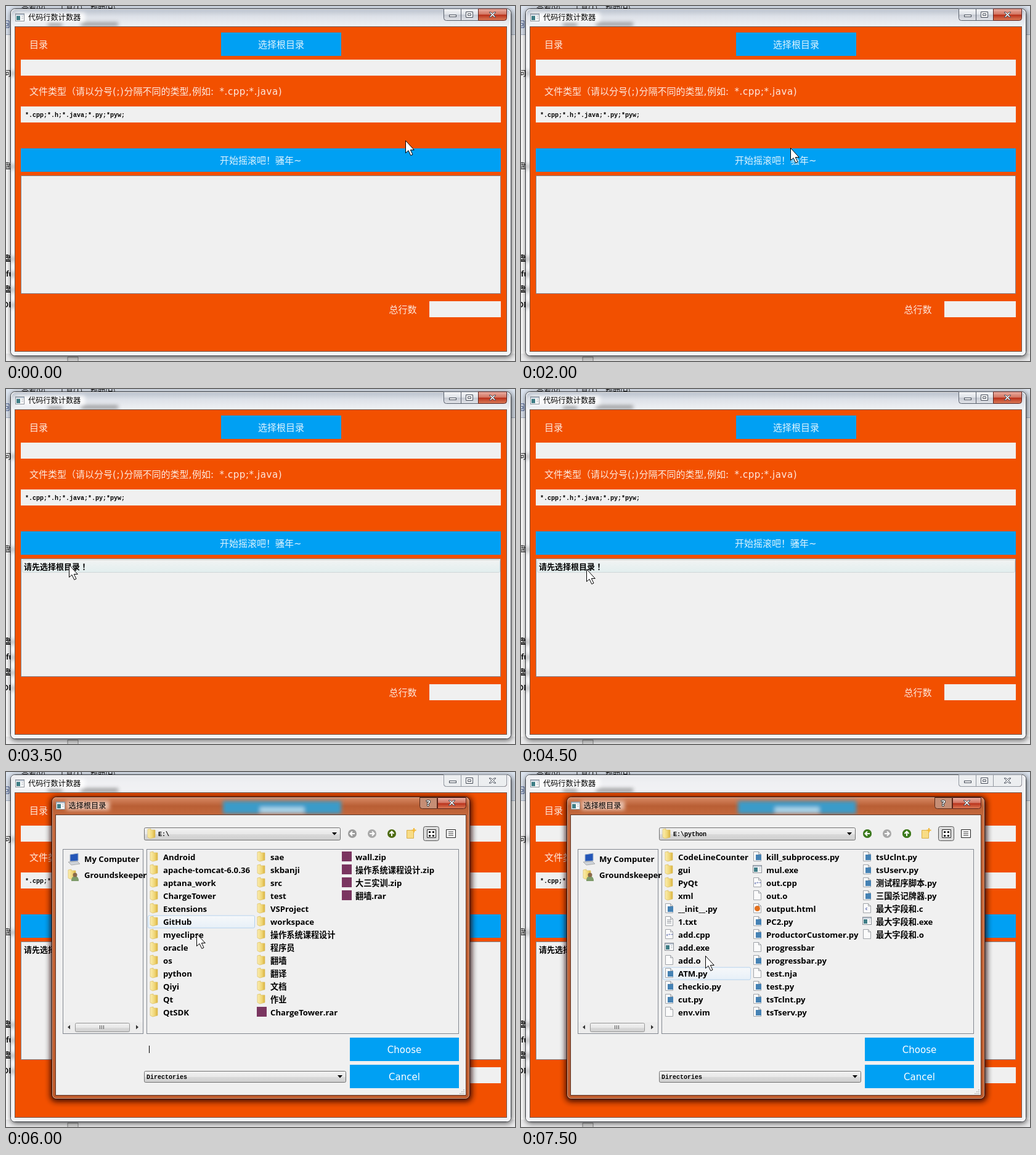
These frames come from a looping animation (826 by 576 pixels, 8 s). An HTML page:

```html
<!DOCTYPE html>
<html lang="zh">
<head>
<meta charset="utf-8">
<title>代码行数计数器</title>
<style>
html, body { margin: 0; width: 100%; height: 100%; overflow: hidden; background: #fff; }
svg { display: block; }
text { white-space: pre; }
.ui { font: 300 15px "Noto Sans CJK SC", "Noto Sans CJK", sans-serif; fill: #fff; fill-opacity: .88; }
.latin { font: 400 15px "DejaVu Sans", sans-serif; letter-spacing: .58px; }
.btn { font: 15px "DejaVu Sans", sans-serif; fill: #fff; text-anchor: middle; }
.cap { font: 12.2px "Noto Sans CJK SC", "Noto Sans CJK", sans-serif; fill: #000; }
.bold { font: bold 13.2px "Open Sans", "Noto Sans CJK SC", "Noto Sans CJK", sans-serif; fill: #000; }
.bold.note { font-size: 13px; }
.centred { font-family: "Noto Sans CJK JP", sans-serif; }
.mono { font: bold 10px "Liberation Mono", monospace; fill: #000; }
.back { font: 12px "Noto Sans CJK SC", "Noto Sans CJK", sans-serif; fill: #111; }
.blue { fill: #00a0f3; }
.hot { fill: #0080f3; }
.field { fill: #f0f0f0; }
.frame { fill: #f0f0f0; stroke: #828790; }
.glyph { fill: #fff; stroke: #444b57; }

/* every state holds until the next stop */
.on, #cursor { animation: 8s step-end infinite; }
.on { visibility: hidden; }
.pick { animation-name: pick; }
.rock { animation-name: rock; }
.press { animation-name: press; }
.note { animation-name: note; }
.row { animation-name: row; }
.dialog { animation-name: dialog; }
.first { animation-name: first; }
.second { animation-name: second; }
.typed { animation-name: typed; }
.drive { animation-name: drive; }
.inside { animation-name: inside; }
#cursor { animation-name: move; }
@keyframes pick { 0%, 25%, 75% { visibility: hidden } 18.75%, 68.75% { visibility: visible } }
@keyframes rock { 0%, 43.75% { visibility: hidden } 31.25% { visibility: visible } }
@keyframes press { 0%, 43.75% { visibility: hidden } 37.5% { visibility: visible } }
@keyframes note { 0% { visibility: hidden } 37.5%, 100% { visibility: visible } }
@keyframes row { 0%, 62.5% { visibility: hidden } 43.75% { visibility: visible } }
@keyframes dialog { 0% { visibility: hidden } 75%, 100% { visibility: visible } }
@keyframes first { 0%, 81.25% { visibility: hidden } 75% { visibility: visible } }
@keyframes second { 0%, 93.75% { visibility: hidden } 81.25% { visibility: visible } }
@keyframes typed { 0%, 93.75% { visibility: hidden } 87.5% { visibility: visible } }
@keyframes drive { 0%, 93.75% { visibility: hidden } 75% { visibility: visible } }
@keyframes inside { 0% { visibility: hidden } 93.75%, 100% { visibility: visible } }
@keyframes move {
  0% { transform: translate(648px, 218px) }
  6.25% { transform: translate(491px, 97px) }
  12.5% { transform: translate(463px, 99px) }
  18.75% { transform: translate(448px, 68px) }
  25% { transform: translate(437px, 230px) }
  31.25% { transform: translate(482px, 244px) }
  37.5% { transform: translate(430px, 247px) }
  43.75% { transform: translate(102px, 285px) }
  50% { transform: translate(95px, 290px) }
  56.25% { transform: translate(106px, 292px) }
  62.5% { transform: translate(430px, 19px) }
  68.75% { transform: translate(418px, 77px) }
  75% { transform: translate(309px, 262px) }
  81.25% { transform: translate(296px, 318px) }
  87.5% { transform: translate(298px, 320px) }
  93.75%, 100% { transform: translate(299px, 298px) }
}
</style>
</head>
<body>
<svg width="826" height="576" viewBox="0 0 826 576">
  <defs>
    <linearGradient id="glass" x2="0" y2="1">
      <stop offset="0" stop-color="#bcc3ce"/><stop offset=".4" stop-color="#dde1e8"/>
      <stop offset="1" stop-color="#eff1f4"/>
    </linearGradient>
    <linearGradient id="grey" x2="0" y2="1">
      <stop offset="0" stop-color="#f6f7f9"/><stop offset=".48" stop-color="#dfe2e7"/>
      <stop offset=".52" stop-color="#c6cad2"/><stop offset="1" stop-color="#e2e4e9"/>
    </linearGradient>
    <linearGradient id="red" x2="0" y2="1">
      <stop offset="0" stop-color="#eab0a4"/><stop offset=".48" stop-color="#d37460"/>
      <stop offset=".52" stop-color="#b9311b"/><stop offset="1" stop-color="#dc7d59"/>
    </linearGradient>
    <linearGradient id="copper" x2="0" y2="1">
      <stop offset="0" stop-color="#d98b66"/><stop offset=".03" stop-color="#b95f35"/>
      <stop offset=".06" stop-color="#c4683c"/><stop offset="1" stop-color="#bd5a2c"/>
    </linearGradient>
    <linearGradient id="combo" x2="0" y2="1">
      <stop offset="0" stop-color="#f2f2f2"/><stop offset=".5" stop-color="#e8e8e8"/>
      <stop offset=".52" stop-color="#dadada"/><stop offset="1" stop-color="#cfcfcf"/>
    </linearGradient>
    <linearGradient id="gold">
      <stop offset="0" stop-color="#fbeeb0"/><stop offset=".6" stop-color="#f0d676"/><stop offset="1" stop-color="#d9b23e"/>
    </linearGradient>
    <linearGradient id="hover" x2="0" y2="1">
      <stop offset="0" stop-color="#f6f8fa"/><stop offset="1" stop-color="#e7f0f8"/>
    </linearGradient>
    <linearGradient id="mint" x2="0" y2="1">
      <stop offset="0" stop-color="#f1f3f3"/><stop offset="1" stop-color="#e2eeee"/>
    </linearGradient>
    <filter id="soft" x="-50%" y="-100%" width="200%" height="300%"><feGaussianBlur stdDeviation="3"/></filter>
    <filter id="halo" x="-20%" y="-20%" width="140%" height="140%"><feGaussianBlur stdDeviation="5"/></filter>
    <path id="chevron" d="M0 0h12l16 16-16 16H0l14-16z"/>
    <g id="app">
      <rect x=".5" y=".5" width="14" height="12" fill="#fff" stroke="#8a9097"/>
      <path d="M1 1h13v2H1z" fill="#b9c4d2"/><path d="M2 4h6v7H2z" fill="#3f7d86"/>
      <path d="M10 5h3M10 8h3" stroke="#a9b1ba"/>
    </g>
    <path id="folder" d="M1 1 6 0v2h7v12l-8 2-4-2z" fill="url(#gold)" stroke="#dcbf62" stroke-width=".7"/>
    <path id="page" d="M1.5 .5h8l4 4v11h-12zM9.5 .5v4h4" fill="#fbfbfb" stroke="#a0a4a9"/>
    <path id="rows" d="M0 0h8M0 3h8M0 6h8" stroke="#333"/>
  </defs>

  <!-- what lies behind the window -->
  <rect width="826" height="576" fill="#fff"/>
  <rect width="826" height="46" fill="#dde5f0"/>
  <path d="M0 46.5h826" stroke="#aab6c8"/>
  <rect y="564" width="826" height="12" fill="#ededee"/>
  <path d="M100 569.5h17v8h-17z" fill="#ddd" stroke="#888"/>
  <path d="M0 24h5v11H0M0 28h3v4H0" fill="none" stroke="#344a82"/>
  <g class="back">
    <text x="25" y="8">查看(V)</text><text x="85" y="8">工具(T)</text><text x="137" y="8">帮助(H)</text>
    <text x="-4" y="114">问</text><text x="-4" y="264">盘</text>
    <g font-weight="bold"><text x="-4" y="414">盘</text><text x="0" y="439">fu</text>
    <text x="-4" y="464">盘</text><text x="-5" y="489">ON</text></g>
  </g>

  <!-- main window -->
  <rect x="8" y="6" width="813" height="564" rx="7" fill="#000" opacity=".65" filter="url(#halo)"/>
  <rect x="7.5" y="4.5" width="812" height="563" rx="7" fill="#f4f5f7" stroke="#34383f"/>
  <rect x="9" y="6" width="809" height="27" rx="6" fill="url(#glass)"/>
  <rect class="on dialog" x="8" y="5" width="811" height="562" rx="6" fill="#f2f3f5" opacity=".85"/>
  <rect x="8.5" y="5.5" width="810" height="561" rx="6" fill="none" stroke="#fff" opacity=".85"/>
  <g filter="url(#soft)" opacity=".55">
    <path d="M68 27h23v5H68zM122 27h60v5h-60zM9 105h4v9H9zM9 256h4v9H9zM9 406h4v9H9zM9 431h4v9H9zM9 456h4v9H9zM9 481h4v9H9z" fill="#333"/>
  </g>
  <rect x="16" y="11" width="112" height="15" fill="#fff" opacity=".9" filter="url(#soft)"/>
  <use href="#app" x="15" y="12"/>
  <text class="cap" x="36" y="22.5">代码行数计数器</text>

  <g stroke="#59606c">
    <path d="M710.5 4.5h56v19h-52q-4 0-4-4zM738.5 4.5v19" fill="url(#grey)"/>
    <path d="M766.5 4.5h46v15q0 4-4 4h-42z" fill="url(#red)" stroke="#5c2320"/>
  </g>
  <path class="on dialog" d="M710.5 4.5h102v15q0 4-4 4h-94q-4 0-4-4zM738.5 4.5v19M766.5 4.5v19" fill="#eceef0" stroke="#9297a0"/>
  <g class="glyph">
    <rect x="719.5" y="14.5" width="11" height="3"/>
    <path d="M746.5 9.5h11v9h-11zM749.5 12.5h5v3h-5z"/>
    <path d="M784 10h3l2.5 2.5L792 10h3l-4 4 4 4h-3l-2.5-2.5L787 18h-3l4-4z"/>
  </g>

  <rect x="14.5" y="33.5" width="798" height="527" fill="#f25000" stroke="#6e5a50"/>
  <text class="ui" x="38" y="67.5">目录</text>
  <rect class="blue" x="349" y="43" width="195" height="38"/>
  <text class="ui" x="409" y="67.5">选择根目录</text>
  <g class="on pick">
    <rect class="hot" x="349" y="43" width="195" height="38"/>
    <use href="#chevron" x="375" y="46"/>
    <text class="ui" x="429" y="67.5">选择根目录</text>
  </g>
  <rect class="field" x="24" y="87" width="779" height="26"/>
  <text class="ui" x="38" y="144">文件类型（请以分号<tspan class="latin">(;)</tspan>分隔不同的类型<tspan class="latin">,</tspan>例如<tspan class="latin">: </tspan><tspan class="latin" x="346.5">*.cpp;*.java)</tspan></text>
  <rect class="field" x="24" y="163" width="779" height="26"/>
  <text class="mono" x="31" y="180">*.cpp;*.h;*.java;*.py;*pyw;</text>

  <rect class="blue" x="24" y="231" width="779" height="38"/>
  <text class="ui" x="347" y="255.5">开始摇滚吧！骚年<tspan class="latin">~</tspan></text>
  <g class="on rock">
    <rect class="hot" x="24" y="231" width="779" height="38"/>
    <use href="#chevron" x="50" y="234"/>
    <text class="ui" x="367" y="255.5">开始摇滚吧！骚年<tspan class="latin">~</tspan></text>
  </g>
  <use class="on press" href="#chevron" x="50" y="234" fill="#f0f0f0"/>

  <rect class="frame" x="24.5" y="275.5" width="778" height="191"/>
  <rect class="on row" x="26.5" y="277.5" width="775" height="20" rx="2" fill="url(#mint)" stroke="#cfd6d8"/>
  <text class="bold on note" x="29" y="292.5">请先选择根目录<tspan class="centred" lang="ja">！</tspan></text>
  <text class="ui" x="621.5" y="498">总行数</text>
  <rect class="field" x="687" y="479" width="116" height="26"/>

  <!-- folder dialog -->
  <g class="on dialog">
    <rect x="72" y="40" width="684" height="495" rx="9" fill="#200" opacity=".85" filter="url(#halo)"/>
    <rect x="74.5" y="40.5" width="678" height="490" rx="7" fill="url(#copper)" stroke="#30140c"/>
    <rect x="75.5" y="41.5" width="676" height="488" rx="6" fill="none" stroke="#eeb79b" opacity=".75"/>
    <g filter="url(#soft)">
      <path d="M352 47h192v21H352z" fill="#3b9bc9"/>
      <path d="M412 57h72v10h-72z" fill="#d9edf7" opacity=".7"/>
      <path d="M98 47h70v15H98z" fill="#f4d9cb" opacity=".8"/>
    </g>
    <use href="#app" x="81" y="48"/>
    <text class="cap" x="101.5" y="59">选择根目录</text>
    <path d="M671.5 41.5h28v18h-24q-4 0-4-4z" fill="#c68e75" stroke="#5a2a1a"/>
    <path d="M700.5 41.5h46v14q0 4-4 4h-42z" fill="url(#red)" stroke="#5a2018"/>
    <text class="bold" x="685.5" y="55" text-anchor="middle" style="fill:#fff;stroke:#444;stroke-width:2px;paint-order:stroke">?</text>
    <path class="glyph" d="M718 46h3l2.5 2.5L726 46h3l-4 4 4 4h-3l-2.5-2.5L721 54h-3l4-4z"/>
    <rect class="field" x="80.5" y="69.5" width="666" height="455" stroke="#5d3526"/>

    <rect x="224.5" y="90.5" width="318" height="20" rx="2" fill="url(#combo)" stroke="#707070"/>
    <use href="#folder" x="229" y="92"/>
    <path d="M529 98h8l-4 4.5z"/>
    <g id="nav"></g>
    <path d="M650.5 94.5h11v13h-11z" fill="#f8dc85" stroke="#d9b04b"/>
    <path d="M662 91v7M658.5 94.5h7" stroke="#f2b632" stroke-width="2"/>
    <rect x="677.5" y="88.5" width="25" height="23" rx="3" fill="#dcdcdc" stroke="#555"/>
    <path d="M683.5 93.5h14v13h-14z" fill="#fff" stroke="#222"/>
    <path d="M686 96h3v3h-3zM692 96h3v3h-3zM686 102h3v3h-3zM692 102h3v3h-3z"/>
    <path d="M714.5 93.5h15v13h-15z" fill="#fff" stroke="#222"/>
    <use href="#rows" x="718" y="97"/>

    <rect class="frame" x="92.5" y="125.5" width="130" height="299"/>
    <path d="M104 134 117 132v12l-13 1z" fill="#2456b8" stroke="#9db0c9"/>
    <path d="M101 146l15-1 4 4-14 2z" fill="#cfd4da" stroke="#888" stroke-width=".6"/>
    <use href="#folder" x="100" y="158"/>
    <path d="M106 177q0-8 6-8t6 8z" fill="#7e9b6a"/><circle cx="112" cy="167" r="3.5" fill="#8a6a4a"/>
    <text class="bold" x="127" y="146">My Computer</text>
    <text class="bold" x="127" y="172">Groundskeeper</text>
    <path d="M93 406h129v18H93z" fill="#ececec"/>
    <rect x="112.5" y="407.5" width="88" height="14" rx="2" fill="url(#combo)" stroke="#979797"/>
    <path d="M152.5 411v6M155.5 411v6M158.5 411v6" stroke="#555"/>
    <path d="M104 410.5v7l-4-3.5zM211 410.5v7l4-3.5z" fill="#333"/>

    <rect class="frame" x="228.5" y="125.5" width="506" height="299"/>
    <g fill="url(#hover)" stroke="#b4d2ee">
      <rect class="on first" x="230.5" y="233" width="173" height="20" rx="2"/>
      <rect class="on second" x="230.5" y="317" width="173" height="20" rx="2"/>
      <rect class="on inside" x="230.5" y="317" width="142" height="20" rx="2"/>
    </g>
    <g class="on drive" id="drive"><text class="mono" x="247" y="104">E:\</text></g>
    <g class="on inside" id="inside"><text class="mono" x="247" y="104">E:\python</text></g>
    <path class="on first" d="M232.5 444v12" stroke="#000"/>
    <text class="mono on typed" x="231" y="454">python</text>

    <rect x="224.5" y="485.5" width="327" height="18" rx="2" fill="url(#combo)" stroke="#707070"/>
    <path d="M538 492h8l-4 4.5z"/>
    <text class="mono" x="228" y="498">Directories</text>
    <path class="blue" d="M558 431h177v38H558zM558 475h177v38H558z"/>
    <text class="btn" x="646.5" y="456">Choose</text>
    <text class="btn" x="646.5" y="500">Cancel</text>
    <path d="M743 515v8M740 518v5M737 521v2" stroke="#aaa" stroke-width="1.5" stroke-dasharray="1.5 1.5"/>
  </g>

  <path id="cursor" d="M.5.5v20l4.5-4 3.8 8 3.2-1.5-3.7-7.5h6z" fill="#fff" stroke="#000"/>
</svg>
<script>
const add = (id, markup) => document.getElementById(id).insertAdjacentHTML('beforeend', markup);

const badges = {
  py: '<rect x="5" y="5" width="9" height="9" fill="#4582b4"/>',
  html: '<circle cx="7.5" cy="8.5" r="4.5" fill="#e2701e"/>',
  txt: '<path d="M4 6h7M4 8.5h7M4 11h7" stroke="#8b9096"/>',
  cpp: '<text x="3" y="11" font-size="7" font-weight="bold" fill="#3c4fa0">c++</text>',
  c: '<text x="5" y="11" font-size="8" font-weight="bold" fill="#3c4fa0">c</text>'
};

function icon(name) {
  const type = name.split('.').pop();
  if (name.endsWith('/')) return '<use href="#folder"/>';
  if (type === 'exe') return '<use href="#app" y="1"/>';
  if (type === 'zip' || type === 'rar') return '<rect width="16" height="16" fill="#7a3560"/>';
  return '<use href="#page"/>' + (badges[type] || '');
}

// each column: icon x, text x, names (a slash marks a folder)
function list(id, columns) {
  for (const [iconX, textX, names] of columns)
    names.split(' ').forEach((name, i) => {
      const y = 138 + i * 21;
      add(id, `<g transform="translate(${iconX} ${y - 9})">${icon(name)}</g>
        <text class="bold" x="${textX}" y="${y + 5}">${name.replace('/', '')}</text>`);
    });
}

list('drive', [
  [233, 255, 'Android/ apache-tomcat-6.0.36/ aptana_work/ ChargeTower/ Extensions/ GitHub/ myeclipse/ oracle/ os/ python/ Qiyi/ Qt/ QtSDK/'],
  [407, 429, 'sae/ skbanji/ src/ test/ VSProject/ workspace/ 操作系统课程设计/ 程序员/ 翻墙/ 翻译/ 文档/ 作业/ ChargeTower.rar'],
  [545, 567, 'wall.zip 操作系统课程设计.zip 大三实训.zip 翻墙.rar']
]);
list('inside', [
  [233, 255, 'CodeLineCounter/ gui/ PyQt/ xml/ __init__.py 1.txt add.cpp add.exe add.o ATM.py checkio.py cut.py env.vim'],
  [376, 398, 'kill_subprocess.py mul.exe out.cpp out.o output.html PC2.py ProductorCustomer.py progressbar progressbar.py test.nja test.py tsTclnt.py tsTserv.py'],
  [554, 576, 'tsUclnt.py tsUserv.py 测试程序脚本.py 三国杀记牌器.py 最大字段和.c 最大字段和.exe 最大字段和.o']
]);

const arrow = (x, turn, color, state = '') =>
  `<g class="${state}"><g transform="translate(${x} 100) rotate(${turn})"><circle r="7" fill="${color}"/>
   <path d="M4 0h-7M0-3.5-3.5 0 0 3.5" fill="none" stroke="#fff" stroke-width="2"/></g></g>`;
add('nav', arrow(562, 0, '#9b9b9b') + arrow(594, 180, '#a8a8a8') + arrow(626, 90, '#4d6b12') +
  arrow(562, 0, '#3b7a1c', 'on inside') + arrow(626, 90, '#3b7a1c', 'on inside'));
</script>
</body>
</html>
```
